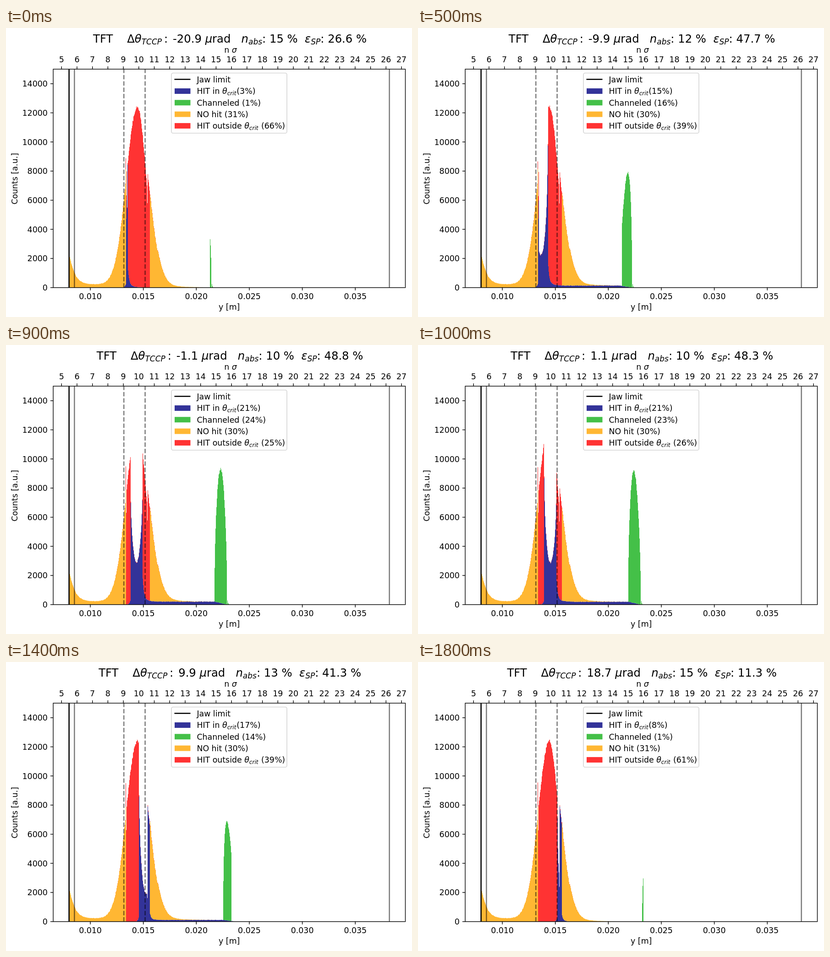
Recreate the animation shown at these times as an HTML page with a canvas. Size 886 px wide and 632 px high, loop 1.9 s.

```html
<!DOCTYPE html>
<html lang="en">
<head>
<meta charset="utf-8">
<title>Beam profile</title>
<style>
html, body { margin: 0; width: 100%; height: 100%; overflow: hidden; background: #fff; }
canvas { display: block; }
</style>
</head>
<body>
<canvas width="886" height="632"></canvas>
<script>
const ctx = document.querySelector('canvas').getContext('2d');
const STEPS = 19, STEP_MS = 100;
const LEFT = 103, RIGHT = 871.5, TOP = 90, BASE = 567.7, PER_COUNT = 63.7 / 2000;
const SMALL = 17.36, LARGE = 24.3;
const BLUE = '#333399', GREEN = '#44c048', ORANGE = '#ffb733', RED = '#ff3333';
const HALF = 'rgba(0,0,0,.5)';

// Readings at selected scan steps, linear in between
const KEYS = [0, 3, 7, 9, 12, 14, 18];
const READINGS = {
  absorbed: [15, 13, 11, 10, 11, 13, 15],
  efficiency: [26.6, 46.7, 48.6, 48.8, 47.3, 41.3, 11.3],
  hitIn: [3, 10, 20, 21, 20, 17, 8],
  channeled: [1, 10, 22, 24, 21, 14, 1],
  noHit: [31, 30, 30, 30, 30, 30, 31],
  hitOut: [66, 50, 28, 25, 29, 39, 61],
  plateau: [15, 95, 185, 205, 180, 115, 10],
  spike: [9000, 8000, 9500, 9550, 9550, 9600, 9600]
};
function reading(name, step) {
  const v = READINGS[name];
  let k = 0;
  while (k < KEYS.length - 2 && step > KEYS[k + 1]) k++;
  return v[k] + (v[k + 1] - v[k]) * (step - KEYS[k]) / (KEYS[k + 1] - KEYS[k]);
}

const gauss = (d, s) => Math.exp(-d * d / (2 * s * s));
const clamp = (v, lo, hi) => Math.min(hi, Math.max(lo, v));
const acceptance = u => Math.abs(u) < 1 ? Math.pow(1 - u * u, 0.42) : 0;
function noise(x, seed) {
  const v = Math.sin(x * 12.9898 + seed * 78.233) * 43758.5453;
  return (v - Math.floor(v)) * 2 - 1;
}

// Beam profile in counts at pixel column x
function beam(x, step) {
  const d = x - 286.5;
  if (x < 262) {
    const depth = Math.max(0, x - 138.5) / 12;
    return 220 + 1880 * Math.exp(-Math.pow(depth, 1.1))
      + 12400 * gauss(d, 24) + (x > 260 ? 700 : 0);
  }
  if (x < 263) return 6300;
  if (d < 0) return 12400 * gauss(d, 24.9);
  if (x < 309) return 12400 * gauss(d, 19.3) * (x > 307 ? 0.86 : 1);
  return 11660 * gauss(d, 24.9) * (x < 314 ? 1 + 0.002 * step : 1)
    + (x > 330 ? 200 * Math.exp(-Math.max(0, x - 340) / 30) : 0);
}

// Counts per category in column x, listed from bottom to top
function stack(x, step) {
  const mid = 251.6 + 3.65 * step, a = mid - 13.4, b = mid + 13.4;
  const exitMid = 434.5 + 3.8 * step, exitEnd = exitMid + 13.6;
  const inCrystal = x >= 262 && x < 314;
  let total = beam(x, step);
  if (x > 263 && x < 309) total *= 1 - 0.766 * acceptance((x - mid) / 13.4);

  let blue = 0, green = 0, orange = 0, red = 0;
  const start = clamp(a, 261.5, 314), end = clamp(b, 262, 314);
  if (inCrystal && x >= a && x <= b) {
    blue = total * (x < 264 ? 0.75 : 0.99);
  } else if (x < start) {
    blue = x > 240 ? 300 * Math.exp((x - start) / 2.5) : 0;
  } else {
    const far = b > 313 ? 0.25 : 1, d = x - end;
    const fade = clamp((exitEnd - x) / 27, 0, 1);
    blue = far * (1400 * Math.exp(-d / 2.5) + 300 * Math.exp(-d / 9))
      + reading('plateau', step) * fade;
  }
  if (inCrystal) {
    red = Math.max(0, total - blue);
  } else {
    orange = total;
    if (x > 235 && x < 350) red = 0.008 * total;
    if (x === 261) red = Math.max(0, reading('spike', step) - total - blue);
  }
  if (x >= 445 && x < 492) {
    green = 9230 * gauss(x + 0.5 - 468, 21) * acceptance((x + 0.5 - exitMid) / 13.6);
    if (x > exitEnd) green = 500 * Math.exp((exitEnd - x) / 1.2);
  }
  return [[blue, BLUE], [green, GREEN], [orange, ORANGE], [red, RED]];
}

function drawHistogram(step) {
  for (let x = 138; x < 500; x++) {
    let y = BASE;
    stack(x, step).forEach(([count, color], k) => {
      if (count < 4) return;
      const jitter = Math.sqrt(count) * noise(x, k === 2 ? 3 : step + k);
      const h = Math.max(0, count + jitter) * PER_COUNT;
      ctx.fillStyle = color;
      ctx.fillRect(x, y - h, 1, h);
      y -= h;
    });
  }
}

function line(x1, y1, x2, y2, width = 1.4, color = '#000', dash = []) {
  ctx.strokeStyle = color;
  ctx.lineWidth = width;
  ctx.setLineDash(dash);
  ctx.beginPath();
  ctx.moveTo(x1, y1);
  ctx.lineTo(x2, y2);
  ctx.stroke();
  ctx.setLineDash([]);
}

// Runs are plain strings, em gaps, or [string, 'i' italic | 's' subscript]
function text(runs, x, y, align = 0, size = SMALL) {
  const parts = [].concat(runs).map(run => {
    const [str, style] = Array.isArray(run) ? run : [run, ''];
    if (typeof str === 'number') return { width: str * size };
    const font = (style ? 'italic ' : '') + size * (style === 's' ? 0.7 : 1) + 'px "DejaVu Sans", sans-serif';
    ctx.font = font;
    return { str, font, drop: style === 's' ? 0.155 * size : 0, width: ctx.measureText(str).width };
  });
  x -= align * parts.reduce((sum, p) => sum + p.width, 0);
  ctx.fillStyle = '#000';
  for (const p of parts) {
    if (p.str) {
      ctx.font = p.font;
      ctx.fillText(p.str, x, y + p.drop);
    }
    x += p.width;
  }
}

function drawAxes() {
  for (let n = 5; n <= 27; n++) {
    const x = 121.2 + 33.72 * (n - 5);
    line(x, TOP - 6.1, x, TOP);
    text(String(n), x, 75, 0.5);
  }
  for (let n = 0; n <= 14000; n += 2000) {
    const y = BASE - n * PER_COUNT;
    line(LEFT - 6.1, y, LEFT, y);
    text(String(n), 90.8, y + 6.4, 1);
  }
  for (let k = 0; k < 6; k++) {
    const x = 184 + 115.65 * k;
    line(x, BASE, x, BASE + 6.1);
    text((0.01 + 0.005 * k).toFixed(3), x, 592.8, 0.5);
  }
  ctx.strokeStyle = '#000';
  ctx.lineWidth = 1.4;
  ctx.strokeRect(LEFT, TOP, RIGHT - LEFT, BASE - TOP);
  text(['n ', ['σ', 'i']], 490, 54, 0.5);
  text('y [m]', 487.2, 616, 0.5);
  ctx.save();
  ctx.translate(24.5, 329.5);
  ctx.rotate(-Math.PI / 2);
  text('Counts [a.u.]', 0, 0, 0.5);
  ctx.restore();
}

function drawLegend(step) {
  ctx.beginPath();
  ctx.roundRect(361, 98.5, 252, 131.5, 3.5);
  ctx.fillStyle = 'rgba(255,255,255,.8)';
  ctx.fill();
  ctx.strokeStyle = '#d6d6d6';
  ctx.lineWidth = 1.7;
  ctx.stroke();

  const percent = name => '(' + Math.round(reading(name, step)) + '%)';
  const crit = [['θ', 'i'], ['crit', 's']];
  line(367.5, 112.3, 402.5, 112.3, 2.6);
  text('Jaw limit', 416.4, 118.6);
  [
    [BLUE, ['HIT in ', ...crit, 0.05, percent('hitIn')]],
    [GREEN, ['Channeled ' + percent('channeled')]],
    [ORANGE, ['NO hit ' + percent('noHit')]],
    [RED, ['HIT outside ', ...crit, 0.05, ' ' + percent('hitOut')]]
  ].forEach(([color, label], k) => {
    const y = 144 + 25.3 * k;
    ctx.fillStyle = color;
    ctx.fillRect(368, y - 12, 34.5, 12);
    text(label, 416.4, y + 0.3);
  });
}

function drawTitle(step) {
  const angle = (-20.9 + 2.2 * step).toFixed(1);
  text([
    'TFT    Δ', ['θ', 'i'], ['TCCP', 's'], 0.2, ':', 0.45, angle + ' ', ['μ', 'i'], 'rad   ',
    ['n', 'i'], ['abs', 's'], ': ' + Math.round(reading('absorbed', step)) + ' %  ',
    ['ε', 'i'], ['SP', 's'], ': ' + reading('efficiency', step).toFixed(1) + ' %'
  ], 488.6, 32, 0.5, LARGE);
}

function draw(step) {
  ctx.fillStyle = '#fff';
  ctx.fillRect(0, 0, 886, 632);
  drawHistogram(step);
  line(137.6, BASE, 137.6, TOP, 2.6);
  for (const x of [149.3, 836.7]) line(x, BASE, x, TOP, 2.6, HALF);
  for (const x of [257.2, 303.6]) line(x, BASE, x, TOP, 2.6, HALF, [9.6, 4.2]);
  drawAxes();
  drawLegend(step);
  drawTitle(step);
}

let shown = -1;
function tick() {
  const step = Math.floor(performance.now() / STEP_MS) % STEPS;
  if (step !== shown) draw(shown = step);
  requestAnimationFrame(tick);
}
tick();
</script>
</body>
</html>
```
